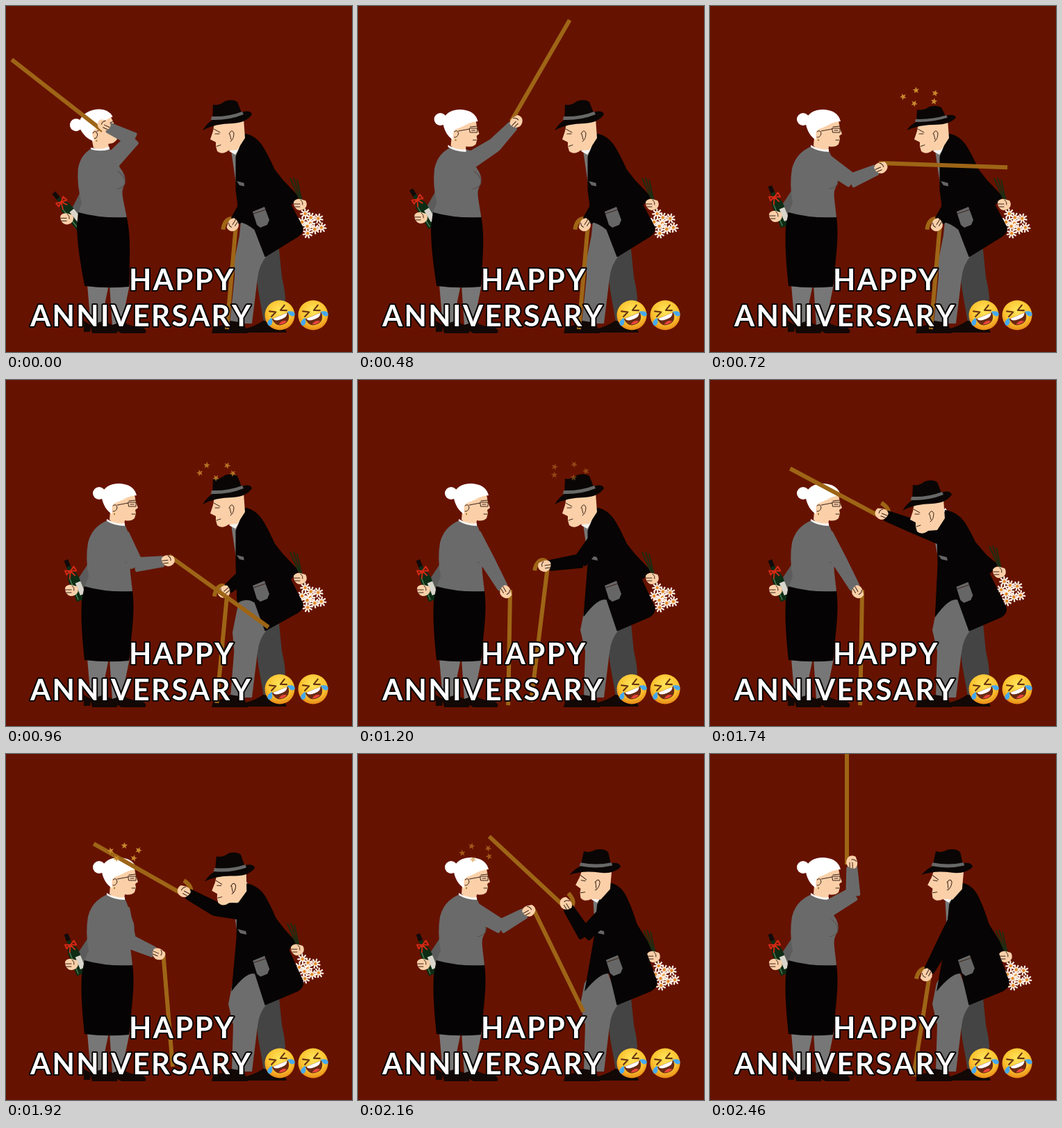
These frames come from a looping animation (498 by 498 pixels, 2.52 s). An HTML page:

```html
<!DOCTYPE html>
<html lang="en">
<head>
<meta charset="utf-8">
<title>Happy Anniversary</title>
<style>
html, body { margin: 0; width: 100%; height: 100%; overflow: hidden; background: #661200; }
svg { display: block; width: 498px; height: 498px; }
text { font: 700 42px Lato, "Open Sans", sans-serif; letter-spacing: 2.4px; font-kerning: none; fill: #fff;
  stroke: #080403; stroke-width: 4px; stroke-linejoin: round; paint-order: stroke; }
.skin { fill: #fbd0a8; }
.ink { fill: none; stroke: #3b2118; stroke-width: 1; stroke-linecap: round; }
.grey { fill: #6a6a6a; stroke: #6a6a6a; }
.black { fill: #060404; stroke: #060404; }
.sleeve { stroke-width: 5; stroke-linejoin: round; }
.cane { fill: none; stroke: #9e6516; stroke-width: 6; stroke-linejoin: round; }
</style>
</head>
<body>
<svg viewBox="0 0 498 498">
  <defs>
    <radialGradient id="gold" cx=".5" cy=".35" r=".65">
      <stop offset="0" stop-color="#ffe65a"/><stop offset=".65" stop-color="#fbc12f"/><stop offset="1" stop-color="#e88a17"/>
    </radialGradient>
    <g id="laugh">
      <circle r="21.5" fill="url(#gold)"/>
      <g transform="rotate(-22) scale(.9)">
        <path d="M-14 1H14Q13 16 0 16T-14 1Z" fill="#6b2a12"/>
        <path d="M-12 1H12Q11 7 0 7T-12 1Z" fill="#fff"/>
        <path d="M-7 13Q0 8 7 13Q0 17-7 13Z" fill="#e8453c"/>
        <path d="M-13-12L-4-7L-13-3M13-12L4-7L13-3" fill="none" stroke="#6b3410" stroke-width="2.4" stroke-linecap="round" stroke-linejoin="round"/>
        <path d="M-13-1Q-25 1-23 8Q-19 12-15 6ZM13-1Q25 1 23 8Q19 12 15 6Z" fill="#45a9ee"/>
      </g>
    </g>
    <g id="fist">
      <path class="skin" d="M-9-4Q-6-9 1-8L8-6Q11-2 9 3Q6 8-1 8Q-9 6-9-4Z"/>
      <path class="ink" stroke-width=".8" d="M-8-1H0M-7 3H0M1-7Q5-4 4 0"/>
    </g>
  </defs>
  <rect width="498" height="498" fill="#661200"/>

  <!-- woman -->
  <g fill="#777">
    <path d="M117 401H148L142 430L138 460H122Z"/>
    <path d="M149 401H178L172 430L168 460H153Z"/>
  </g>
  <g fill="#120806">
    <path d="M112 453L122 459L138 454L150 462L160 466V471H124L122 462L121 469H112Z"/>
    <path d="M141 454L153 459L168 454Q180 462 197 463Q204 467 200 471H166L150 462L149 469H141Z"/>
  </g>
  <path id="backSleeve" fill="none" stroke="#5c5c5c" stroke-width="14"/>
  <g id="bottle">
    <path d="M-3-38H3V-24Q8-19 8-11V20H-8V-11Q-8-19-3-24Z" fill="#0c2c14"/>
    <path d="M-3-42H3V-32H-3Z" fill="#120a0a"/>
    <path d="M-5-15V18" stroke="#4e7a50" stroke-width="1.5"/>
    <path d="M0-6H8V13H0Z" fill="#d9d5cc"/>
    <path d="M0-25L-7-28V-22L0-25L7-29L8-22ZL-5-15M0-25L4-16" fill="none" stroke="#d32a14" stroke-width="2" stroke-linejoin="round"/>
  </g>
  <use id="backFist" href="#fist"/>
  <g id="wBody">
    <path d="M113 296L182 302Q185 325 182 355L177 404Q145 407 113 403Q107 350 109 318Z" fill="#050303"/>
    <path d="M146 202L171 208Q177 220 178 232Q187 244 184 256Q177 264 179 278L182 304Q145 306 113 297L119 283Q114 258 118 234Q124 211 146 202Z" fill="#6a6a6a"/>
    <path class="ink" stroke-opacity=".4" d="M175 238Q187 247 183 257Q178 263 172 263"/>
  </g>
  <g id="wHead">
    <path class="skin" d="M152 166L185 165L187 176L190 184L186 187L187 192L185 199Q180 204 171 202L170 209Q156 210 149 201Z"/>
    <path d="M145 200Q158 208 171 206V210Q156 210 145 203Z" fill="#f7f5f2"/>
    <path d="M137 165Q143 149 163 149Q184 150 188 166Q176 167 167 173L155 178Q151 183 153 193Q140 186 137 165Z" fill="#fff"/>
    <circle cx="134" cy="163" r="9" fill="#fff"/>
    <path class="ink" d="M154 181Q159 177 160 184Q158 190 154 189M160 180L176 177M176 176H187V182H177ZM179 179H184M181 193H186M177 174L187 173"/>
    <circle cx="156" cy="193" r="1.2" fill="#a7812d"/>
  </g>

  <!-- man -->
  <path d="M357 358L393 350L397 390Q403 415 402 431L398 455H371L363 410Z" fill="#444"/>
  <path id="frontLeg" fill="#6d6d6d"/>
  <g fill="#120806">
    <path d="M298 463Q312 460 323 453L342 456L348 471H296Z"/>
    <path d="M342 465Q359 461 370 453L398 456L404 470H340Z"/>
  </g>
  <path id="rearSleeve" fill="none" stroke="#060404" stroke-width="17"/>
  <g id="bunch">
    <path d="M-14-38L3 0M-9-39L3 0M-7-32L6 8M-4-36L4 0" fill="none" stroke="#1d2d12" stroke-width="2"/>
    <g id="flowers"></g>
    <use href="#fist"/>
  </g>
  <g id="mBody">
    <path d="M324 208L344 184L342 255H331Z" fill="#777"/>
    <path d="M321 209L336 196L344 184L347 189L330 214Z" fill="#f4f2ee"/>
    <path id="coat" class="black" stroke="none"/>
    <path d="M332 252L344 255L345 260L336 258Z" fill="#666"/>
  </g>
  <path id="mCane" class="cane"/>
  <path id="mArm" class="sleeve black"/>
  <g id="mHead">
    <path class="skin" d="M300 168L298 180L294 192L302 196L302 202L304 209Q311 215 320 208L333 207L344 190L342 162Z"/>
    <path class="ink" d="M299 177L308 182M301 184H307M303 202L309 200M321 184Q325 176 328 183Q328 192 323 195M322 184L324 192"/>
    <g id="hat">
      <path d="M283 179Q289 169 297 164L298 142Q307 144 315 137Q326 133 333 138L339 153Q352 149 354 156Q346 168 326 169Q301 169 283 179Z" fill="#0a0606"/>
      <path d="M296 159Q319 160 340 152L342 156Q320 165 295 164Z" fill="#686868"/>
    </g>
  </g>
  <g id="pocket">
    <path d="M355 296L372 289L379 308L376 315L366 319L361 315Z" fill="#666"/>
    <path class="ink" d="M356 299L374 293"/>
  </g>
  <use id="mFist" href="#fist"/>

  <path id="wCane" class="cane"/>
  <path id="wArm" class="sleeve grey"/>
  <use id="wFist" href="#fist"/>
  <g id="mStars"></g>
  <g id="wStars"></g>

  <text x="177" y="409">HAPPY</text>
  <text x="35" y="461">ANNIVERSARY</text>
  <use href="#laugh" x="394" y="445"/>
  <use href="#laugh" x="442" y="445"/>
</svg>
<script>
const LOOP = 2520, STEP = 60, DEG = 180 / Math.PI;
const $ = id => document.getElementById(id);
const set = (id, name, value) => $(id).setAttribute(name, value);
const move = (id, value) => set(id, "transform", value);
const ramp = (t, from, to) => Math.min(1, Math.max(0, (t - from) / (to - from)));

// Key poses of the hand that holds the cane: time, x, y, cane angle.
const WOMAN = [
  [0, 141, 172, -142], [480, 228, 167, -60], [720, 246, 233, 2],
  [1200, 212, 305, 91], [1800, 212, 305, 91], [2160, 246, 226, 64], [2460, 204, 156, -90]
];
const MAN = [
  [840, 327, 315, 95], [1200, 269, 268, 97], [1560, 281, 164, 272],
  [1740, 247, 193, 208], [1860, 251, 196, 208], [2160, 299, 216, 223], [2460, 312, 318, 99]
];

function pose(keys, t) {
  const next = keys.findIndex(key => key[0] > t);
  if (next < 1) return keys.at(next).slice(1);
  const a = keys[next - 1], b = keys[next];
  const u = ramp(t, a[0], b[0]) ** 1.4;
  return a.map((v, i) => v + (b[i] - v) * u).slice(1);
}

// Sideways shear by dx over a height, keeping the line y = base in place.
const shear = (dx, height, base) => `matrix(1 0 ${-dx / height} 1 ${dx / height * base} 0)`;

function taper(ax, ay, wa, bx, by, wb) {
  const a = Math.atan2(by - ay, bx - ax), nx = -Math.sin(a) / 2, ny = Math.cos(a) / 2;
  return `M${ax + nx * wa} ${ay + ny * wa}L${bx + nx * wb} ${by + ny * wb}` +
    `L${bx - nx * wb} ${by - ny * wb}L${ax - nx * wa} ${ay - ny * wa}Z`;
}

// Two equal bones; side tells which way the elbow bends.
function arm(who, sx, sy, x, y, bone, side) {
  const dx = x - sx, dy = y - sy, reach = Math.hypot(dx, dy);
  const bend = side * Math.sqrt(Math.max(0, bone * bone - reach * reach / 4)) / reach;
  const ex = sx + dx / 2 - dy * bend, ey = sy + dy / 2 + dx * bend;
  const turn = Math.atan2(y - ey, x - ex), flip = Math.cos(turn) < 0;
  const wx = x - 8 * Math.cos(turn), wy = y - 8 * Math.sin(turn);
  set(who + "Arm", "d", taper(sx, sy, 20, ex, ey, 16) + taper(ex, ey, 16, wx, wy, 11));
  move(who + "Fist", `translate(${x} ${y}) rotate(${turn * DEG + (flip ? 180 : 0)}) scale(${flip ? -1 : 1} 1)`);
}

function cane(id, x, y, angle, d) {
  set(id, "d", d);
  move(id, `translate(${x} ${y}) rotate(${angle})`);
}

// Points evenly round a circle, as a path with the given joining rule.
const ring = (n, draw) => Array.from({ length: n }, (_, i) => draw(i, i * 2 * Math.PI / n)).join("");

const starShape = ring(10, (i, a) => {
  const r = i % 2 ? 2.1 : 5;
  return `${i ? "L" : "M"}${r * Math.sin(a)} ${-r * Math.cos(a)}`;
}) + "Z";
for (const id of ["mStars", "wStars"])
  $(id).innerHTML = `<path d="${starShape}" fill="#c98a2c"/>`.repeat(5);

function stars(id, age, life, cx, cy, rx) {
  const on = age >= 0 && age < life;
  set(id, "opacity", on ? Math.min(1, 1.25 - age / life) : 0);
  [...$(id).children].forEach((star, i) => {
    const a = i * 2 * Math.PI / 5 + .45 + age / 260;
    star.setAttribute("transform",
      `translate(${cx + rx * Math.cos(a)} ${cy + 10 * Math.sin(a)}) rotate(${i * 20 + age / 8})`);
  });
}

// Blossoms spread by the golden angle.
$("flowers").innerHTML = ring(9, i => {
  const r = 6 * Math.sqrt(i), a = i * 2.4;
  const petals = ring(8, (_, b) => `M0 0L${6.5 * Math.cos(b + i)} ${6.5 * Math.sin(b + i)}`);
  return `<g transform="translate(${15 + r * Math.cos(a)} ${27 + r * Math.sin(a)})">
    <path d="${petals}" stroke="#fff1e6" stroke-width="2.2" stroke-linecap="round"/><circle r="2.2" fill="#e08a28"/></g>`;
});

function drawWoman(t) {
  const [x, y, angle] = pose(WOMAN, t);
  const lean = 17 * (1 - ramp(t, 0, 720) ** 2);
  const bx = 97 - lean * .4, by = 303 + lean * .2;
  move("wBody", shear(-lean, 197, 400));
  move("wHead", `translate(${-lean - Math.min(6, lean)} 0) rotate(${16 * ramp(t, 0, 480) - 16} 158 203)`);
  set("backSleeve", "d", `M${128 - lean * .6} 262L${bx + 8} ${by - 6}`);
  move("bottle", `translate(${bx + 5} ${by - 5}) rotate(${-22 - lean})`);
  move("backFist", `translate(${bx - 3} ${by})`);
  arm("w", 166 - lean * .9, 225, x, y, 46, 1);
  // The cane looks longest when it points at him.
  const len = 163 + 19 * Math.max(0, Math.cos(angle / DEG)) ** 3;
  cane("wCane", x, y, angle, `M-3 -7H${len}`);
}

function drawMan(t) {
  const [x, y, angle] = pose(MAN, t);
  const stance = ramp(t, 840, 1200), strike = ramp(t, 1500, 1740), back = ramp(t, 1800, 2160);
  const lean = 25 * back - 6 * strike, drop = 9 * strike - 6 * back;
  const tall = 1 - .2 * (ramp(t, 600, 660) - ramp(t, 720, 900));
  const rx = 423 - 7 * strike + 9 * back, ry = 286 - 9 * strike + 15 * back;
  const top = 184 + drop * .4, hem = 318 + stance * 9;
  move("mBody", shear(lean, 200, 360));
  move("pocket", `translate(${lean * .1} ${drop * .2})`);
  move("mHead", `translate(${lean} ${drop}) rotate(${9 * back} 335 190)`);
  move("hat", `translate(0 ${178 * (1 - tall)}) scale(1 ${tall})`);
  set("coat", "d", `M344 ${top}Q361 ${top + 3} 371 205Q385 229 394 256L427 ${hem}Q429 ${hem + 8} 420 ${hem + 14}L373 361L358 ${322 - stance * 6}Q346 312 ${337 - stance * 12} ${311 + stance * 29}L331 265L331 217Z`);
  set("frontLeg", "d", `M338 310L360 316L376 359Q364 372 362 392L354 457H${322 + stance * 3}L${329 - stance * 2} 390L${329 - stance * 9} ${365 - stance * 5}L${336 - stance * 10} 330Z`);
  set("rearSleeve", "d", `M${378 + lean * .5} 238L${394 + lean * .3} 258L${rx - 7} ${ry - 5}`);
  move("bunch", `translate(${rx} ${ry})`);
  arm("m", 352 + lean * .6, 219 + drop * 1.4, x, y, 52, -1);
  // Pointing down, the cane reaches the floor.
  const len = Math.max(147, (466 - y) * Math.sin(angle / DEG));
  cane("mCane", x, y, angle, `M${len} -4L2 -4C-13 -4 -13 13 8 14`);
}

function frame(now) {
  const t = Math.floor((now % LOOP) / STEP) * STEP;
  drawWoman(t);
  drawMan(t);
  stars("mStars", t - 660, 660, 303, 131, 25);
  stars("wStars", t - 1800, 540, 171, 142, 21);
}

let start;
function tick(now) {
  start ??= now;
  frame(now - start);
  requestAnimationFrame(tick);
}
frame(0);
requestAnimationFrame(tick);
</script>
</body>
</html>
```
